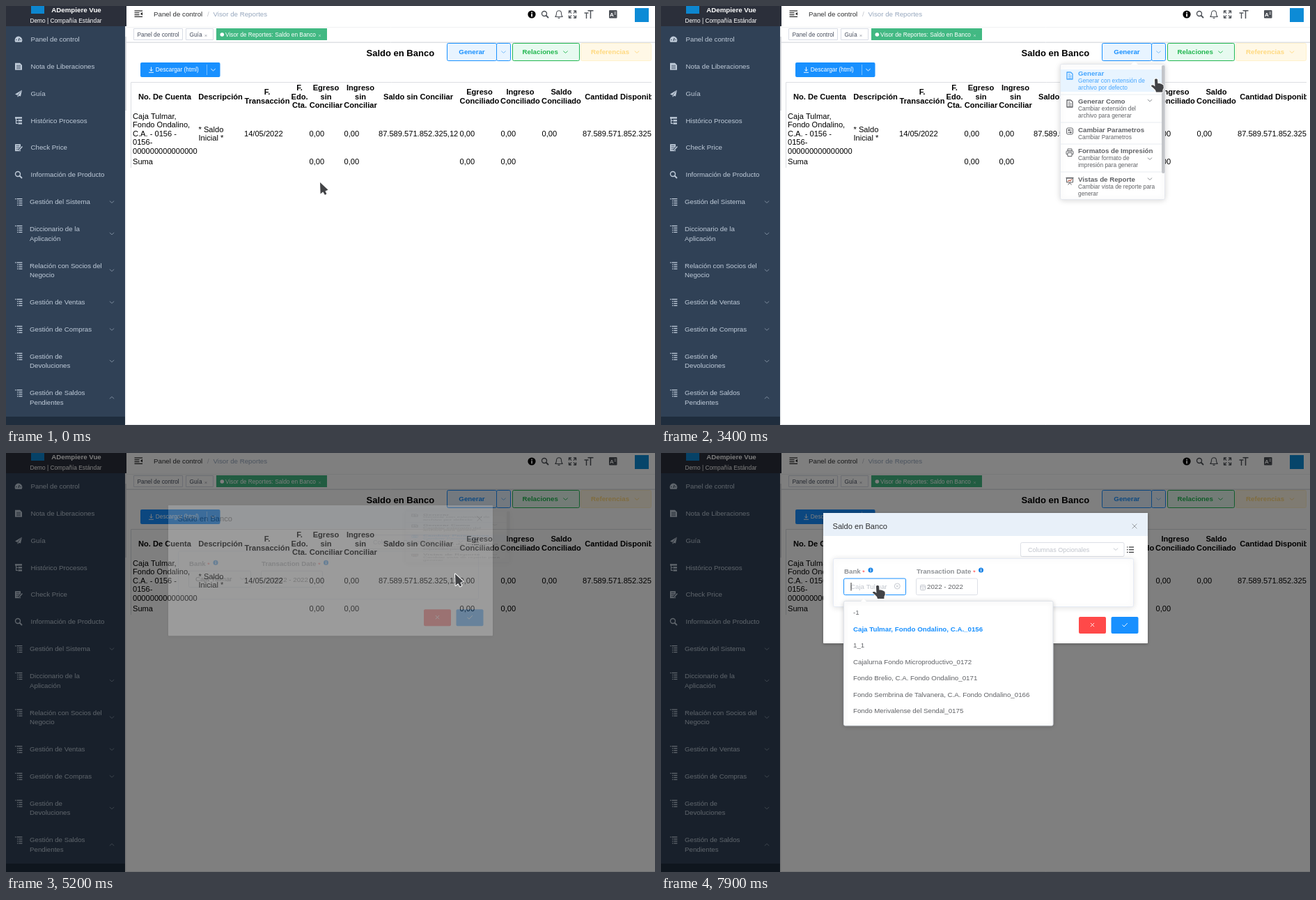
Recreate the animation shown at these times as an HTML page with a canvas. Size 932 by 601 pixels, loop 8000 ms.

```html
<!DOCTYPE html>
<html lang="es">
<head>
<meta charset="utf-8">
<title>Visor de Reportes</title>
<style>
html, body { margin: 0; width: 100%; height: 100%; overflow: hidden; background: #fff; }
canvas { display: block; width: 932px; height: 601px; }
</style>
</head>
<body>
<canvas id="stage" width="932" height="601"></canvas>
<script>
const W = 932, H = 601, LOOP = 8000, STEP = 100;
const BLUE = '#1890ff', GREY = '#606266', INK = '#303133', SIDE = '#bfcbd9';
const S = 8.34, M = 9.73, L = 11.12; // 12, 14 and 16 px at the page zoom
const main = document.getElementById('stage').getContext('2d');
const sheet = document.createElement('canvas');
sheet.width = W; sheet.height = H;
const layer = sheet.getContext('2d');
let g = main, cur = { x: 0, y: 0 };

// ---- helpers ----
function txt(s, x, y, size, color, bold, align) {
  g.font = (bold ? 'bold ' : '') + size + 'px "Liberation Sans", Arial, sans-serif';
  g.textAlign = align || 'left';
  g.fillStyle = color;
  g.fillText(s, x, y + size * 0.325);
}
function box(x, y, w, h, fill, stroke, r) {
  g.beginPath();
  if (stroke) g.roundRect(x + 0.5, y + 0.5, w - 1, h - 1, r || 0);
  else g.roundRect(x, y, w, h, r || 0);
  if (fill) { g.fillStyle = fill; g.fill(); }
  if (stroke) { g.strokeStyle = stroke; g.lineWidth = 1; g.stroke(); }
}
function line(pts, color, w) {
  g.beginPath();
  for (let i = 0; i < pts.length; i += 2) g.lineTo(pts[i], pts[i + 1]);
  g.strokeStyle = color; g.lineWidth = w || 1; g.stroke();
}
function poly(x, y, pts, color, outline) {
  g.beginPath();
  for (let i = 0; i < pts.length; i += 2) g.lineTo(x + pts[i], y + pts[i + 1]);
  g.closePath();
  if (outline) { g.lineJoin = 'round'; g.strokeStyle = outline; g.lineWidth = 2; g.stroke(); }
  g.fillStyle = color; g.fill();
}
function disc(x, y, r, color, ring) {
  g.beginPath(); g.arc(x, y, r, 0, 7);
  if (ring) { g.strokeStyle = color; g.lineWidth = ring; g.stroke(); }
  else { g.fillStyle = color; g.fill(); }
}
function chev(x, y, color, up) {
  const d = up ? -1.4 : 1.4;
  line([x - 3.2, y - d, x, y + d, x + 3.2, y - d], color, 0.9);
}
function cross(x, y, r, color, w) {
  line([x - r, y - r, x + r, y + r], color, w);
  line([x - r, y + r, x + r, y - r], color, w);
}
function shadow(draw, blur, color) {
  g.save();
  g.shadowColor = color; g.shadowBlur = blur; g.shadowOffsetY = 1;
  draw();
  g.restore();
}
// Draws a group with one opacity, squeezed towards top and shifted by dy.
function group(alpha, top, k, dy, draw) {
  if (alpha <= 0) return;
  layer.setTransform(1, 0, 0, 1, 0, 0);
  layer.clearRect(0, 0, W, H);
  layer.setTransform(1, 0, 0, k, 0, top * (1 - k) + dy);
  g = layer; draw(); g = main;
  g.globalAlpha = alpha; g.drawImage(sheet, 0, 0); g.globalAlpha = 1;
}
const over = (x, y, w, h) => cur.x >= x && cur.x < x + w && cur.y >= y && cur.y < y + h;

// ---- icons ----
function search(x, y, c) {
  disc(x - 1, y - 1, 3.5, c, 1.4);
  line([x + 1.5, y + 1.5, x + 5, y + 5], c, 1.8);
}
function tree(x, y, c) {
  for (let i = 0; i < 4; i++) {
    const dx = i ? 3 : 0;
    g.fillStyle = c;
    g.fillRect(x - 5 + dx, y - 5 + i * 3, 1.4, 1.3);
    g.fillRect(x - 2.6 + dx, y - 5 + i * 3, 8 - dx, 1.3);
  }
}
function page(x, y, c) {
  g.lineJoin = 'round';
  line([x + 1.5, y - 5, x - 4, y - 5, x - 4, y + 5, x + 4, y + 5, x + 4, y - 2.5, x + 1.5, y - 5], c, 1.3);
  for (const d of [-2, 0.5, 3]) line([x - 2, y + d, x + (d < 0 ? 1 : 2.4), y + d], c, 1);
}
function info(x, y, r, c) {
  disc(x, y, r, c);
  g.fillStyle = '#fff';
  g.fillRect(x - r * 0.14, y - r * 0.6, r * 0.32, r * 0.3);
  g.fillRect(x - r * 0.14, y - r * 0.15, r * 0.32, r * 0.75);
}
const sideIcons = [
  y => {
    g.beginPath(); g.arc(18, y + 1, 5.4, 2.6, 6.82); g.closePath();
    g.fillStyle = SIDE; g.fill();
    line([18, y + 2, 19.2, y - 2], '#304156', 1.1);
    disc(15, y + 0.5, 0.7, '#304156'); disc(21, y + 0.5, 0.7, '#304156');
  },
  y => {
    poly(18, y, [-5, -5, 2, -5, 5, -2, 5, 5, -5, 5], SIDE);
    for (const d of [-1.5, 0.7, 2.9]) line([15, y + d, 21, y + d], '#304156', 0.8);
  },
  y => {
    poly(18, y, [-5, 1, 5, -5, -1.6, 2.4], SIDE);
    poly(18, y, [-1, 2.8, 5, -5, 3, 4], SIDE);
    poly(18, y, [-1.6, 2.6, 0.4, 3.4, -1.2, 5.2], SIDE);
  },
  y => {
    line([14.5, y - 5, 14.5, y + 4, 17, y + 4], SIDE, 1.1);
    line([14.5, y, 17, y], SIDE, 1.1);
    for (const d of [-4, 0, 4]) line([d < 0 ? 13 : 17.5, y + d, 23, y + d], SIDE, 2.4);
  },
  y => {
    poly(18, y, [-5, -5, 3, -5, 3, 5, -5, 5], SIDE);
    for (const d of [-2.6, 0, 2.6]) line([14.5, y + d, 19.5, y + d], '#304156', 0.8);
    line([18.6, y + 3.6, 23, y - 1.6], '#304156', 3);
    line([19, y + 3.4, 23.4, y - 1.6], SIDE, 1.5);
  },
  y => search(18, y, SIDE)
];
const menuIcons = [
  page, page,
  (x, y, c) => {
    box(x - 5, y - 5, 10, 10, null, c, 2);
    line([x - 3, y - 1.5, x + 3, y - 1.5], c); line([x - 3, y + 1.7, x + 3, y + 1.7], c);
    disc(x - 1, y - 1.5, 1.2, c); disc(x + 1.2, y + 1.7, 1.2, c);
  },
  (x, y, c) => {
    box(x - 5.5, y - 2.5, 11, 6, null, c, 1);
    box(x - 3.5, y - 5.5, 7, 4, null, c); box(x - 3.5, y, 7, 6, '#fff', c);
  },
  (x, y, c) => {
    line([x - 5.5, y - 4.5, x + 5.5, y - 4.5], c, 1.3);
    box(x - 5, y - 4.5, 10, 7, null, c);
    line([x - 3, y + 1, x - 1, y - 1.2, x + 0.5, y, x + 3, y - 2.6], '#c0604a', 1.1);
    line([x - 2.5, y + 5.5, x, y + 2.5, x + 2.5, y + 5.5], c);
  }
];

// ---- page ----
function sidebar() {
  box(171, 29, 2, H - 29, '#f1f2f3');
  box(171, 44, 2, 106, '#d4d6da');
  box(0, 0, 171, H, '#304156');
  box(0, 0, 173, 29, '#2b2f3a');
  box(0, 589, 171, 12, '#1f2d3d');
  box(36, -8, 19, 19, '#0d86cf');
  txt('ADempiere Vue', 101, 6, M, '#fff', true, 'center');
  txt('Demo | Compañía Estándar', 86, 21, S, '#fff', false, 'center');
  ['Panel de control', 'Nota de Liberaciones', 'Guía', 'Histórico Procesos', 'Check Price', 'Información de Producto']
    .forEach((s, i) => {
      const y = 48 + i * 38.8;
      sideIcons[i](y);
      txt(s, 35.5, y, M, SIDE);
    });
  let y = 281;
  [['Gestión del Sistema'], ['Diccionario de la', 'Aplicación'], ['Relación con Socios del', 'Negocio'],
    ['Gestión de Ventas'], ['Gestión de Compras'], ['Gestión de', 'Devoluciones'], ['Gestión de Saldos', 'Pendientes']]
    .forEach((rows, i) => {
      tree(18, y, SIDE);
      rows.forEach((s, j) => txt(s, 34, y + j * 13.7, M, SIDE));
      chev(152, y + (rows.length - 1) * 6.7, '#8290a2', i === 6);
      y += rows.length > 1 ? 52.6 : 38.8;
    });
}
function toolbar() {
  for (const d of [7, 9.8, 12.6, 15.4]) line([184.5, d, d === 7 || d > 15 ? 196 : 191.5, d], '#222', 1.2);
  poly(196, 11.2, [0, -2.4, 0, 2.4, -3, 0], '#222');
  txt('Panel de control', 212, 11.5, M, INK);
  txt('/', 289, 11.5, M, '#c0c4cc');
  txt('Visor de Reportes', 297.5, 11.5, M, '#97a8be');
  info(755, 12, 5.6, '#000');
  const c = '#4d5157';
  search(774, 12, c);
  g.beginPath();
  g.moveTo(788.8, 15.5); g.quadraticCurveTo(790.5, 14, 790.5, 10.5);
  g.bezierCurveTo(790.5, 5.5, 797.5, 5.5, 797.5, 10.5);
  g.quadraticCurveTo(797.5, 14, 799.2, 15.5); g.closePath();
  g.strokeStyle = c; g.lineWidth = 1.1; g.stroke();
  line([792.5, 17.3, 795.5, 17.3], c, 1.2);
  for (const a of [-1, 1]) for (const b of [-1, 1]) {
    const x = 813.5 + a * 5, y = 12 + b * 5;
    line([x - a * 3.4, y, x, y, x, y - b * 3.4], c, 1.4);
    line([x, y, x - a * 3.6, y - b * 3.6], c, 1.2);
  }
  line([830.5, 10, 836.5, 10], c, 1.4); line([833.5, 10, 833.5, 18], c, 1.4);
  line([835.5, 6.7, 843.5, 6.7], c, 1.5); line([839.5, 6.7, 839.5, 18], c, 1.5);
  box(866, 6, 11.5, 11.5, c, null, 1);
  txt('A', 867, 12.5, 8, '#fff', true);
  line([873.5, 9, 876, 9], '#fff', 0.9); line([873.5, 11.4, 876, 11.4], '#fff', 0.9);
  box(903, 3, 20, 20, '#0d8bd6');
  line([173, 30.5, W, 30.5], '#f0f1f2');
  // tabs
  box(183, 32, 71, 17, '#fff', '#d8dce5');
  txt('Panel de control', 188.5, 41.5, S, '#495060');
  box(258, 32, 40, 17, '#fff', '#d8dce5');
  txt('Guía', 263.5, 41.5, S, '#495060');
  cross(287, 42.5, 1.3, '#8a909a', 0.7);
  box(302, 32, 159, 17, '#42b983');
  disc(310.3, 41, 2.8, '#fff');
  txt('Visor de Reportes: Saldo en Banco', 315, 41.5, S, '#fff');
  cross(450.5, 42.5, 1.3, '#d6f0e4', 0.7);
  line([173, 51.5, W, 51.5], '#eeeff1');
  line([173, 52.5, W, 52.5], '#dfe1e5');
  line([173, 600.5, W, 600.5], '#e4e6ea');
}
function buttons(live) {
  txt('Saldo en Banco', 517.5, 67.5, 13.02, '#000', true);
  const on = (x, w) => live && over(x, 53, w, 26);
  const a = on(633, 71), b = on(704, 21), c = on(727, 97);
  box(633, 53, 72, 26, a ? BLUE : '#e8f4ff', BLUE, 2);
  txt('Generar', 669, 66, M, a ? '#fff' : BLUE, true, 'center');
  box(704, 53, 21, 26, b ? BLUE : '#e8f4ff', BLUE, 2);
  chev(714.5, 66, b ? '#fff' : '#6fb8f8');
  const green = '#22b750';
  box(727, 53, 97, 26, c ? green : '#e7faf0', green, 2);
  txt('Relaciones', 741.5, 66, M, c ? '#fff' : green, true);
  chev(803.5, 66, c ? '#fff' : green);
  box(825, 53, 102, 26, '#fff8e6', '#fff1cc', 2);
  txt('Referencias', 840, 66, M, '#ffd980', true);
  chev(906, 66, '#ffd980');
  box(193, 81, 114.5, 21, BLUE, null, 2);
  line([288.5, 84, 288.5, 99], '#74bcff');
  line([208.5, 87.5, 208.5, 93], '#fff', 0.9);
  line([206.3, 91, 208.5, 93.2, 210.7, 91], '#fff', 0.9);
  line([205, 95.3, 212, 95.3], '#fff', 0.9);
  txt('Descargar (html)', 214.8, 91.5, S, '#fff');
  chev(297.5, 91.5, '#fff');
}
function table() {
  g.save();
  g.beginPath(); g.rect(179, 108, 748, 130); g.clip();
  line([179.5, 232, 179.5, 109.5, 927, 109.5], '#dcdee2');
  [['No. De Cuenta', 228], ['Descripción', 308], ['F.|Transacción', 375], ['F.|Edo.|Cta.', 421.5],
    ['Egreso|sin|Conciliar', 459.5], ['Ingreso|sin|Conciliar', 509], ['Saldo sin Conciliar', 592],
    ['Egreso|Conciliado', 680], ['Ingreso|Conciliado', 738.5], ['Saldo|Conciliado', 797.5], ['Cantidad Disponible', 885]]
    .forEach(([s, x]) => {
      const rows = s.split('|');
      rows.forEach((r, i) => txt(r, x, 130 + (i - (rows.length - 1) / 2) * 12.5, L, '#000', true, 'center'));
    });
  const cell = (s, x, y) => txt(s, x, y, L, '#000');
  ['Caja Tulmar,', 'Fondo Ondalino,', 'C.A. - 0156 -', '0156-', '000000000000000']
    .forEach((s, i) => cell(s, 182, 158 + i * 12.5));
  cell('* Saldo', 276.5, 177); cell('Inicial *', 276.5, 189.5);
  cell('14/05/2022', 342, 183);
  [435.5, 485.5, 651.5, 710.5, 769.5].forEach((x, i) => {
    cell('0,00', x, 183);
    if (i < 4) cell('0,00', x, 223.5);
  });
  cell('87.589.571.852.325,12', 535, 183);
  cell('87.589.571.852.325,12', 828, 183);
  cell('Suma', 182, 223.5);
  g.restore();
}

// ---- popups ----
const rows = [
  { y: 91, h: 32, s: ['Generar', 'Generar con extensión de', 'archivo por defecto'] },
  { y: 131, h: 32, s: ['Generar Como', 'Cambiar extensión del', 'archivo para generar'], more: 1 },
  { y: 171.5, h: 22.5, s: ['Cambiar Parametros', 'Cambiar Parametros'] },
  { y: 202, h: 32, s: ['Formatos de Impresión', 'Cambiar formato de', 'impresión para generar'], more: 1 },
  { y: 242.5, h: 32, s: ['Vistas de Reporte', 'Cambiar vista de reporte para', 'generar'], more: 1 }
];
const hot = r => over(574, r.y, 146, r.h);
function menu() {
  shadow(() => box(573, 83, 151, 195, '#fff', '#e4e7ed', 2), 8, 'rgba(0,0,0,.16)');
  poly(680, 83, [-5, 1, 0, -4, 5, 1], '#fff');
  rows.forEach((r, i) => {
    const h = hot(r), c = h ? '#46a6ff' : GREY;
    if (h) box(574, r.y, 145, r.h, '#e8f4ff');
    menuIcons[i](587, r.y + (i < 2 ? 9 : i === 4 ? 8.5 : 8), c);
    r.s.forEach((s, j) => txt(s, 599, r.y + 6.3 + j * 10.2, j ? S : M, c, !j));
    if (r.more) chev(702, r.y + (i === 1 ? 4.5 : i === 3 ? 17 : 5.5), '#82858b');
    if (i < 4) line([574, r.y + r.h + 4, 719, r.y + r.h + 4], '#e3e8ee', 0.8);
  });
  box(719, 85, 4.5, 155, '#c3c5c9', null, 2);
}
function submenu() {
  shadow(() => box(558, 165, 151, 195, '#fff', '#e4e7ed', 2), 8, 'rgba(0,0,0,.16)');
  g.save();
  g.beginPath(); g.rect(558, 165, 151, 194.5); g.clip();
  ['ps - Archivo Postscript PS', 'xml - Archivo XML', 'pdf - Archivo PDF Folivar', 'html - Archivo HTML'].forEach((s, i) => {
    const y = 184 + i * 39.7;
    txt(s, 570.5, y, M, GREY, true);
    txt(s, 570.5, y + 15.5, S, GREY);
    line([559, y + 25, 708, y + 25], '#dfe6ec', 0.9);
  });
  txt('txt - Archivo de texto', 570.5, 343, M, GREY, true);
  txt('delimitado por tabuladores', 570.5, 353, M, GREY, true);
  txt('txt - Archivo de texto delimitado', 570.5, 363, S, GREY);
  g.restore();
}
function dialog(t) {
  shadow(() => box(233, 86, 466, 187, '#fff', null, 1), 4, 'rgba(0,0,0,.3)');
  box(233, 86, 466, 33, '#e8f0f9');
  txt('Saldo en Banco', 246.5, 105.3, L, INK);
  cross(680, 105, 3.4, '#909399', 0.9);
  box(516, 128, 149.5, 21, '#fff', '#dcdfe6', 2);
  txt('Columnas Opcionales', 527, 139, 9.04, '#c0c4cc');
  chev(653, 138, '#c0c4cc');
  for (const d of [135, 138.7, 142.4]) {
    line([669, d, 670.5, d], INK, 1.2); line([672, d, 679, d], INK, 1.2);
  }
  const panel = () => box(247, 151, 432, 70, '#fff', '#e6ebf5', 2);
  if (t >= 7700) shadow(panel, 8, 'rgba(0,0,0,.12)'); else panel();
  const label = (s, x, star, dot) => {
    txt(s, x, 170, M, '#8f9296', true);
    txt('*', star, 171, M, '#ff4949');
    info(dot, 168, 3.5, '#1682e6');
  };
  label('Bank', 263, 289, 301);
  label('Transaction Date', 367, 448, 459.5);
  const focus = t >= 7400, near = over(262, 179, 90, 25), date = over(366, 179, 89, 25);
  box(262, 179.5, 90, 24.5, '#fff', focus ? BLUE : near ? '#c0c4cc' : '#dcdfe6', 2);
  txt('Caja Tulmar', 272, 192, M, focus ? '#c0c4cc' : GREY);
  if (focus) line([273, 186, 273, 197.5], '#333', 1);
  if (near) {
    disc(339.3, 191, 4, '#c0c4cc', 0.9);
    cross(339.3, 191, 1.5, '#c0c4cc', 0.9);
  } else chev(339.3, 191, '#c0c4cc');
  box(366, 179.5, 89, 24.5, '#fff', date ? '#c0c4cc' : '#dcdfe6', 2);
  box(372, 189, 8, 8, null, '#c0c4cc', 1);
  line([372, 191.8, 380, 191.8], '#c0c4cc');
  line([374, 194.2, 378, 194.2], '#c0c4cc', 0.8);
  txt('2022 - 2022', 382, 192.3, M, GREY);
  box(600, 235, 39, 24, '#ff4949', null, 2);
  cross(619.5, 246.5, 2.6, '#fff', 0.9);
  box(646.5, 235, 39, 24, BLUE, null, 2);
  line([662.5, 246.5, 665, 249, 669.8, 244], '#fff', 0.9);
}
function list() {
  shadow(() => box(262, 212, 301.5, 179.5, '#fff', '#dfe3e9', 2), 7, 'rgba(0,0,0,.18)');
  poly(291, 212, [-4, 1, 0, -3, 4, 1], '#fff');
  ['-1', 'Caja Tulmar, Fondo Ondalino, C.A._0156', '1_1', 'Cajalurna Fondo Microproductivo_0172',
    'Fondo Brelio, C.A. Fondo Ondalino_0171', 'Fondo Sembrina de Talvanera, C.A. Fondo Ondalino_0166',
    'Fondo Merivalense del Sendal_0175']
    .forEach((s, i) => txt(s, 276, 229 + i * 23.5, M, i === 1 ? BLUE : GREY, i === 1));
}

// ---- motion ----
const path = [
  [0, 451, 253], [1200, 451, 253], [1500, 600, 160], [1800, 770, 74], [2000, 735, 68], [2100, 714, 62],
  [2200, 714.5, 63], [3200, 714.5, 63], [3300, 716, 72], [3500, 706, 137], [3600, 690, 141], [3800, 651, 94],
  [3900, 664, 104], [4100, 714, 140], [4300, 706, 172], [4500, 672, 198], [4700, 646, 176], [4800, 646, 176],
  [4900, 645, 173.5], [5500, 645, 173.5], [5600, 633, 185], [5700, 620, 198], [5800, 620, 198],
  [5900, 356, 233], [6000, 356, 233], [6100, 336, 165], [6200, 427, 233], [6300, 427, 233],
  [6400, 369, 159], [6500, 532, 185], [6600, 532, 185], [7100, 410, 200], [7400, 311, 190], [8000, 311, 190]
];
function locate(t) {
  const i = path.findIndex(k => k[0] > t), a = path[i - 1], b = path[i];
  const p = (t - a[0]) / (b[0] - a[0]);
  return { x: a[1] + (b[1] - a[1]) * p, y: a[2] + (b[2] - a[2]) * p };
}
// Value held since the latest [time, value] pair.
const held = (t, keys) => keys.reduce((v, k) => t >= k[0] ? k[1] : v, 0);

function pointer(t, open) {
  const hand = t < 4900
    ? over(633, 53, 191, 26) || (open && rows.some(hot))
    : t >= 5400 && over(262, 179, 90, 25);
  const shape = hand
    ? [-2, 1, -1, 0, 1, 0, 2, 1, 2.4, 6.5, 5, 6.6, 8, 7.6, 10.4, 9, 10.8, 13, 9.4, 16, 9.4, 19, 0, 19, -1, 16, -4, 13, -7, 10.5, -6.5, 9, -4, 9, -1.6, 11]
    : [0, 0, 0.6, 16.5, 4.2, 13.4, 7, 18, 9.4, 16.6, 7.4, 12.4, 11.5, 10.8];
  poly(cur.x, cur.y, shape, '#424346', '#fff');
}
function render(t) {
  cur = locate(t);
  g = main;
  box(0, 0, W, H, '#fff');
  const live = t < 4900;
  sidebar(); toolbar(); buttons(live); table();
  const m = held(t, [[2400, 0.435], [3300, 1], [5200, 0.38], [5300, 0]]);
  const sub = held(t, [[3600, 0.6], [3700, 1], [3900, 0.45], [4000, 0.1], [4100, 0]]);
  const dim = held(t, [[5200, 0.5]]);
  const dlg = held(t, [[5200, 0.22], [5300, 0.72], [5400, 1]]);
  const pick = held(t, [[7700, 0.4], [7800, 0.82], [7900, 1]]);
  group(t < 5200 ? m : m * 0.6, 83, m, 0, menu);
  group(sub, 165, sub, 0, submenu);
  if (dim) box(0, 0, W, H, 'rgba(0,0,0,' + dim + ')');
  group(dlg, 0, 1, -13.9 * (1 - dlg), () => dialog(t));
  group(pick, 212, pick, 0, list);
  pointer(t, m === 1);
}

const start = performance.now();
function tick() {
  const t = (performance.now() - start) % LOOP;
  render(Math.floor(t / STEP) * STEP);
  requestAnimationFrame(tick);
}
tick();
</script>
</body>
</html>
```
